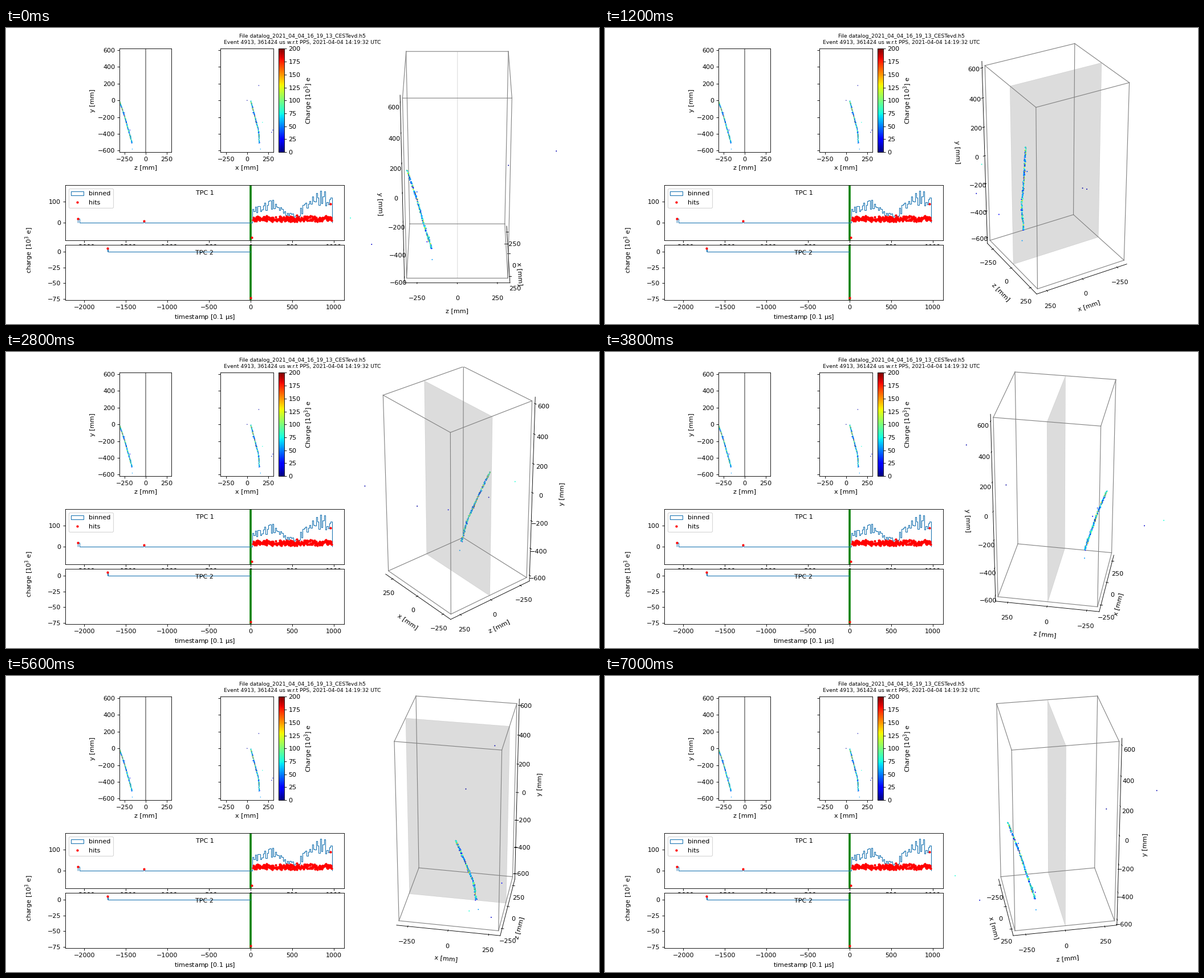
A matplotlib script for the animation above (7200 ms loop, 1040 px wide and 520 px high).

```python
from itertools import combinations, product

import matplotlib.pyplot as plt
import numpy as np
from matplotlib.animation import FuncAnimation
from mpl_toolkits.mplot3d.art3d import Poly3DCollection

WIDTH, HEIGHT, DPI = 1040, 520, 80
FRAMES, INTERVAL = 36, 200
HALF_X, HALF_Y, HALF_Z = 308, 617, 315  # drift volume, mm
SIDE_TICKS, UP_TICKS = range(-250, 251, 250), range(-600, 601, 200)
CHARGE_STYLE = dict(cmap="jet", vmin=0, vmax=200, linewidths=0)

plt.rcParams.update({"font.family": "DejaVu Sans", "font.size": 10})
rng = np.random.default_rng(4913)
fig = plt.figure(figsize=(WIDTH / DPI, HEIGHT / DPI), dpi=DPI, facecolor="white")


def panel(left, top, right, bottom, **kwargs):
    """Add axes given by pixel edges, measured from the top left."""
    box = [left / WIDTH, 1 - bottom / HEIGHT,
           (right - left) / WIDTH, (bottom - top) / HEIGHT]
    return fig.add_axes(box, **kwargs)


def make_hits(count=300):
    """Charge deposits along one bent track, plus a few stray hits."""
    y = rng.uniform(-508, -8, count)
    x = np.interp(y, [-508, -360, -8], [146, 136, 44]) + rng.normal(0, 2, count)
    z = np.interp(y, [-508, -167, -8], [-161, -256, -309]) + rng.normal(0, 2.5, count)
    x, y = (4.43 * np.round(v / 4.43) for v in (x, y))
    charge = 15 + rng.gamma(2.2, 24, count) + 30 * np.exp((y + 8) / 40)

    stray = np.array([
        (0, 0, 317), (139, 178, 598), (292, -381, -526), (305, -354, -185),
        (68, -147, -250), (159, -581, -158), (183, -262, -659),
    ])
    stray_charge = 6 + 72 * np.linspace(0, 1, len(stray)) ** 2
    track = np.column_stack([x, y, z, charge])
    return np.vstack([track, np.column_stack([stray, stray_charge])]).T


def draw_projections(x, y, z, charge):
    side = panel(199.3, 36.4, 290.4, 218)
    front = panel(376.4, 36.4, 469.3, 218)
    side.axvline(0, color="gray", lw=1.5)
    side.scatter(z, y, c=charge, s=1.6, **CHARGE_STYLE)
    dots = front.scatter(x, y, c=charge, s=1.6, **CHARGE_STYLE)
    for ax, half, name in ((side, HALF_X, "z"), (front, HALF_Z, "x")):
        ax.set(xlim=(-half, half), ylim=(-HALF_Y, HALF_Y), xlabel=f"{name} [mm]",
               xticks=SIDE_TICKS, yticks=UP_TICKS)
    side.set_ylabel("y [mm]")
    front.tick_params(labelleft=False)
    bar = fig.colorbar(dots, cax=panel(478.2, 36.4, 487.8, 218),
                       ticks=range(0, 201, 25))
    bar.set_label("Charge [10$^3$] e")


def draw_timeline(ax, title, edges, heights, times, charges):
    ax.axvline(4, color="green", lw=3.2, zorder=1.5)
    ax.hist(edges[:-1], bins=edges, weights=heights, histtype="step",
            color="tab:blue", label="binned")
    ax.plot(times, charges, "r.", ms=5.5, label="hits")
    ax.text(0.5, 0.86, title, transform=ax.transAxes, ha="center", va="center")
    ax.set(xlim=(-2228, 1125), xticks=range(-2000, 1001, 500))


def draw_timelines(hit_count=260, busy_bins=60):
    upper = panel(104, 276.3, 592.8, 373.3)
    lower = panel(104, 381.2, 592.8, 478.4)

    # Two isolated hits, then a busy stretch under a two-humped envelope.
    edges = -2075 + 16 * np.arange(192)
    heights = np.zeros(191)
    heights[[0, 49]] = 19, 8
    envelope = np.interp(np.arange(busy_bins), [0, 15, 34, 36, 53, 59],
                         [75, 110, 30, 90, 165, 130])
    heights[-busy_bins:] = envelope * rng.uniform(0.45, 1, busy_bins)
    times = np.r_[rng.uniform(28, 975, hit_count), -2075, -1283, 12, 964]
    charges = np.r_[rng.triangular(4, 16, 35, hit_count), 19, 8, -70, 90]
    draw_timeline(upper, "TPC 1", edges, heights, times, charges)
    upper.set(ylim=(-84, 177), yticks=[0, 100])
    upper.tick_params(axis="x", pad=2.2)
    upper.legend(loc="upper left")

    edges = np.linspace(-1719, 0, 200)
    heights = np.zeros(199)
    heights[0] = 6
    draw_timeline(lower, "TPC 2", edges, heights, [-1719, 0], [6, -73.5])
    lower.set(ylim=(-77.2, 10.8), yticks=range(-75, 1, 25),
              xlabel=r"timestamp [0.1 $\mathrm{\mu}$s]")
    fig.text(41 / WIDTH, 1 - 390 / HEIGHT, "charge [10$^3$ e]", rotation=90,
             ha="center", va="center")


def draw_volume(x, y, z, charge):
    # Plot coordinates are (x, z, y): detector y points up.
    ax = panel(564.4, 26.3, 1006.4, 468.3, projection="3d", facecolor="none")
    halves = np.array([HALF_X, HALF_Z, HALF_Y])
    corners = halves * np.array(list(product((-1, 1), repeat=3)))
    for a, b in combinations(corners, 2):
        if np.count_nonzero(a != b) == 1:
            ax.plot(*zip(a, b), color="gray", lw=1)

    cathode = [(sx * HALF_X, 0, sx * sy * HALF_Y)
               for sx, sy in product((-1, 1), repeat=2)]
    tint = (0.5, 0.5, 0.5, 0.27)
    ax.add_collection3d(Poly3DCollection([cathode], facecolors=[tint],
                                         edgecolors=[tint], linewidths=0.5))
    ax.scatter(x, z, y, c=charge, s=3, depthshade=False, **CHARGE_STYLE)

    # The axes stand a little outside the volume.
    lim_x, lim_z, lim_y = ((-h, h) for h in halves * 25 / 24)
    ax.set(xlim=lim_x, ylim=lim_z, zlim=lim_y, xlabel="x [mm]", ylabel="z [mm]",
           xticks=SIDE_TICKS, yticks=SIDE_TICKS, zticks=UP_TICKS)
    ax.set_zlabel("y [mm]", labelpad=20)
    ax.set_box_aspect((1, 1, 2))
    ax.grid(False)
    for axis in (ax.xaxis, ax.yaxis, ax.zaxis):
        axis.pane.set_visible(False)
    return ax


hits = make_hits()
volume = draw_volume(*hits)
draw_projections(*hits)
draw_timelines()
fig.suptitle("File datalog_2021_04_04_16_19_13_CESTevd.h5\n"
             "Event 4913, 361424 us w.r.t PPS, 2021-04-04 14:19:32 UTC",
             fontsize="small")


def update(frame):
    # The tiny offset keeps axis sides well defined at right angles.
    volume.view_init(elev=30, azim=frame * 360 / FRAMES + 1e-4)
    return []


animation = FuncAnimation(fig, update, frames=FRAMES, interval=INTERVAL,
                          init_func=lambda: update(0), repeat=True)
plt.show()
```
